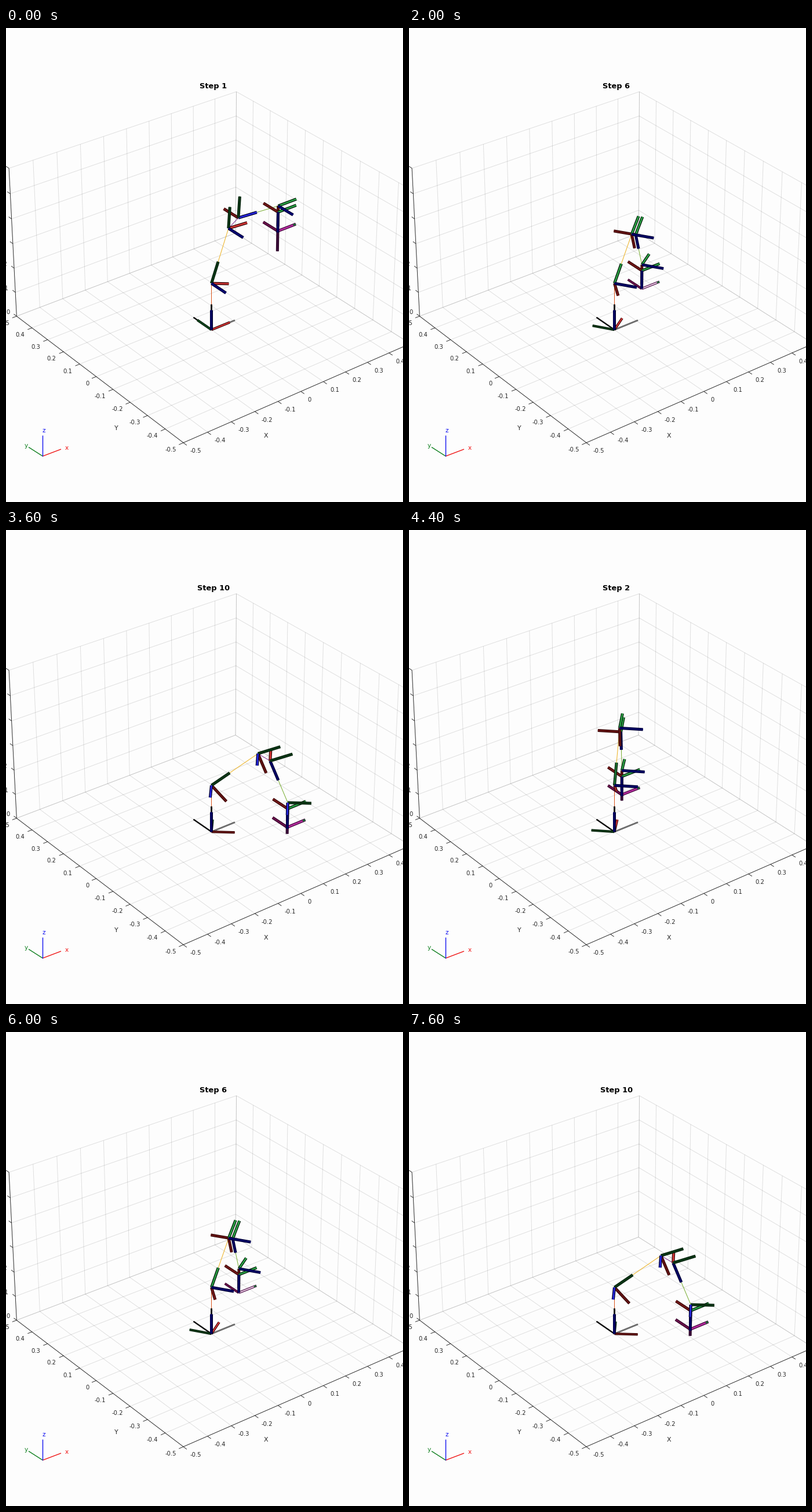
Animation of 685 by 817 pixels, one loop 8 s. Source, as a matplotlib script:

```python
import numpy as np
import matplotlib
import matplotlib.pyplot as plt
from matplotlib.animation import FuncAnimation
from matplotlib.colors import to_rgb

matplotlib.rcParams["font.family"] = "DejaVu Sans"

W, H = 685, 817
PX = 0.72  # points per pixel at 100 dpi
INK = "#262626"

fig = plt.figure(figsize=(W / 100, H / 100), dpi=100, facecolor="#fdfdfd")
ax = fig.add_axes([0, 0, 1, 1])
ax.set(xlim=(0, W), ylim=(H, 0))
ax.axis("off")

# Perspective camera: azimuth -37.5, elevation 30
AZ = np.radians(37.5)
RIGHT = np.array([np.cos(AZ), -np.sin(AZ), 0])
UP = np.array([np.sin(AZ) / 2, np.cos(AZ) / 2, np.sqrt(0.75)])
FORWARD = np.cross(UP, RIGHT)
TARGET = np.array([0, 0, 0.3])
DISTANCE, FOCAL = 7.68, 3793
CENTRE = np.array([354.5, 394.3])


def depth(p):
    return DISTANCE + (np.asarray(p) - TARGET) @ FORWARD


def project(p):
    q = np.asarray(p, float) - TARGET
    return CENTRE + FOCAL / depth(p) * np.array([q @ RIGHT, -(q @ UP)])


def line(a, b, color, width, **kw):
    kw.setdefault("solid_capstyle", "butt")
    return ax.plot([a[0], b[0]], [a[1], b[1]], color=color, lw=width * PX, **kw)[0]


def line3d(a, b, color, width, **kw):
    return line(project(a), project(b), color, width, **kw)


def label(x, y, s, size, color=INK, ha="center", **kw):
    return ax.text(x, y + 0.36 * size, s, fontsize=size * PX, color=color,
                   ha=ha, va="baseline", **kw)


def draw_axes():
    lo, hi, top, tick = -0.5, 0.5, 0.6, 0.0185
    grid = dict(color=INK, width=0.9, alpha=0.15)
    for v in np.arange(-5, 6) / 10:
        line3d((v, lo, 0), (v, hi, 0), **grid)
        line3d((lo, v, 0), (hi, v, 0), **grid)
        line3d((v, hi, 0), (v, hi, top), **grid)
        line3d((hi, v, 0), (hi, v, top), **grid)
        text = f"{v:g}"
        line3d((v, lo, 0), (v, lo - tick, 0), INK, 0.9)
        line3d((lo, v, 0), (lo - tick, v, 0), INK, 0.9)
        x, y = project((v, lo, 0))
        label(x + 11.5, y + 14, text, 10, ha="left", clip_on=True)
        x, y = project((lo, v, 0))
        label(x - 12.5, y + 11.7, text, 10, ha="right", clip_on=True)
    for z in np.arange(7) / 10:
        line3d((lo, hi, z), (hi, hi, z), **grid)
        line3d((hi, lo, z), (hi, hi, z), **grid)
        line3d((lo, hi, z), (lo, hi + tick, z), INK, 0.9)
        x, y = project((lo, hi, z))
        label(x - 12, y - 7.5, f"{z:g}", 10, ha="right", clip_on=True)
    corner = (lo, lo, 0)
    line3d(corner, (hi, lo, 0), INK, 0.9)
    line3d(corner, (lo, hi, 0), INK, 0.9)
    line3d((lo, hi, 0), (lo, hi, top), INK, 0.9)
    label(448, 702, "X", 11)
    label(190, 689, "Y", 11)


def draw_compass():
    o = (63.3, 738)
    for end, at, name, color in [((95, 726), (105, 723), "x", "#f01818"),
                                 ((39, 722.5), (35, 719.5), "y", "#108020"),
                                 ((63.3, 702), (65, 693), "z", "#1010f0")]:
        line(o, end, color, 1.4)
        label(*at, name, 10.5, color)


# Tube palettes: rim, shaded core, lit core
RED = ("#3c0808", "#661313", "#e23a3a")
GREEN = ("#06230d", "#0b3816", "#2eae4a")
BLUE = ("#000038", "#00006c", "#2c2cf0")
ROSE = ("#38062c", "#661048", "#a82070")
MAGENTA = ("#4c0a44", "#7a1468", "#c030a8")
PLUM = ("#2c0626", "#3c0c3c", "#702070")
BLACK = ("#0c0c0c", "#0c0c0c", "#0c0c0c")
GREY = ("#1c1c1c", "#808080", "#a0a0a0")

LIGHT = np.array([np.cos(np.radians(27.5)), np.sin(np.radians(27.5)), 0])
AXIS, RADIUS = 0.083, 0.0052
X, Y, Z = np.eye(3)


def mix(a, b, t):
    return tuple((1 - t) * np.array(to_rgb(a)) + t * np.array(to_rgb(b)))


class Tube:
    """One frame axis, cut off where it passes below the floor."""

    def __init__(self, start, d, palette, length=AXIS, radius=RADIUS, bias=0.0):
        if d[2] < -1e-6:
            length = min(length, start[2] / -d[2])
        self.a, self.d, self.length = start, d, max(length, 0)
        self.b = start + d * self.length
        self.palette, self.radius = palette, radius
        self.order = depth((self.a + self.b) / 2) + bias

    def draw(self):
        if self.length < 0.002:
            return []
        rim, dark, lit = self.palette
        t = np.clip((abs(self.d @ LIGHT) - 0.4) / 0.5, 0, 1)
        core = mix(dark, lit, t)
        on_floor = self.a[2] < 0.003 and abs(self.d[2]) < 0.01
        if on_floor and self.palette is MAGENTA:
            core = "#f0d4ea"
        width = 2 * self.radius * FOCAL / self.order
        if on_floor:
            width *= 0.85
        out = [line3d(self.a, self.b, rim, width),
               line3d(self.a, self.b, core, width * 0.45)]
        if self.palette is MAGENTA:
            out.append(line3d(self.b - 0.012 * self.d, self.b, "#1c6a34", width * 0.6))
        return out


def frame_tubes(origin, axes, palettes=(RED, GREEN, BLUE), biases=(0, 0, 0)):
    return [Tube(origin, d, p, bias=b) for d, p, b in zip(axes, palettes, biases)]


# Arm geometry
SHOULDER, ARM, FOREARM = 0.192, 0.21, 0.18
ELBOW_X, ELBOW_Y = 0.0415, 0.03
WRIST_DROP, TOOL = 0.025, 0.077

# Tool positions, one per step
HOVER = 0.025
WAYPOINTS = [
    (0.298, 0, 0.301),
    (0.152, 0.154, HOVER),
    (0.203, 0.183, HOVER), (0.203, 0.183, 0),
    (0.253, 0.165, HOVER), (0.253, 0.165, 0),
    (0.205, -0.175, 0.08), (0.205, -0.175, HOVER),
    (0.205, -0.175, 0), (0.205, -0.175, 0.0275),
]


def solve(tool):
    """Elbow-up joint positions and axes for a tool pointing straight down."""
    x, y, z = tool
    turn = np.arctan2(y, x)
    radial = np.array([np.cos(turn), np.sin(turn), 0])
    normal = np.array([np.sin(turn), -np.cos(turn), 0])
    shoulder = SHOULDER * Z
    wrist = np.array([x, y, z + WRIST_DROP + TOOL])
    rho, rise = np.hypot(x, y), wrist[2] - SHOULDER
    reach = np.hypot(rho, rise)
    fore = np.hypot(ELBOW_X + FOREARM, ELBOW_Y)
    bend = np.arccos((ARM**2 + reach**2 - fore**2) / (2 * ARM * reach))
    lift = np.arctan2(rise, rho) + bend
    link = np.cos(lift) * radial + np.sin(lift) * Z
    elbow = shoulder + ARM * link
    rest = wrist - elbow
    tilt = np.arctan2(rest[2], rest @ radial) - np.arctan2(ELBOW_Y, ELBOW_X + FOREARM)
    along = np.cos(tilt) * radial + np.sin(tilt) * Z
    across = -np.sin(tilt) * radial + np.cos(tilt) * Z
    roll = elbow + ELBOW_X * along + ELBOW_Y * across
    flange = wrist - WRIST_DROP * Z
    tip = flange - TOOL * Z
    frames = [
        (np.zeros(3), (radial, -normal, Z)),
        (shoulder, (np.cross(link, normal), link, normal)),
        (elbow, (along, across, normal)),
        (roll, (-normal, across, along)),
        (wrist, (-Z, radial, normal)),
        (flange, (Y, X, -Z)),
        (tip, (Y, X, -Z)),
    ]
    return frames


LINKS = ["#d95319", "#edb120", "#7e2f8e", "#77ac30", "#4dbeee", "#a2142f"]
draw_axes()
draw_compass()
title = label(357.7, 99, "Step 1", 13, "black", weight="bold")
drawn = []


def update(i):
    while drawn:
        drawn.pop().remove()
    step = i % len(WAYPOINTS)
    title.set_text(f"Step {step + 1}")
    frames = solve(WAYPOINTS[step])
    for (a, _), (b, _), color in zip(frames, frames[1:], LINKS):
        drawn.append(line3d(a, b, color, 1))
    tubes = [Tube(np.zeros(3), d, p, 0.106, 0.003, 0.2)
             for d, p in ((X, GREY), (Y, BLACK), (Z, BLACK))]
    for k, (origin, axes) in enumerate(frames):
        if k == 6:
            tubes += frame_tubes(origin, axes, (ROSE, MAGENTA, PLUM))
        else:
            # the wrist's downward axis sits inside the flange's
            biases = (0.1, 0, 0) if k == 4 else (0, 0, 0)
            tubes += frame_tubes(origin, axes, biases=biases)
    for tube in sorted(tubes, key=lambda t: -t.order):
        drawn.extend(tube.draw())
    return drawn + [title]


anim = FuncAnimation(fig, update, frames=20, interval=400, repeat=True,
                     repeat_delay=0, init_func=lambda: update(0), blit=False)
plt.show()
```
